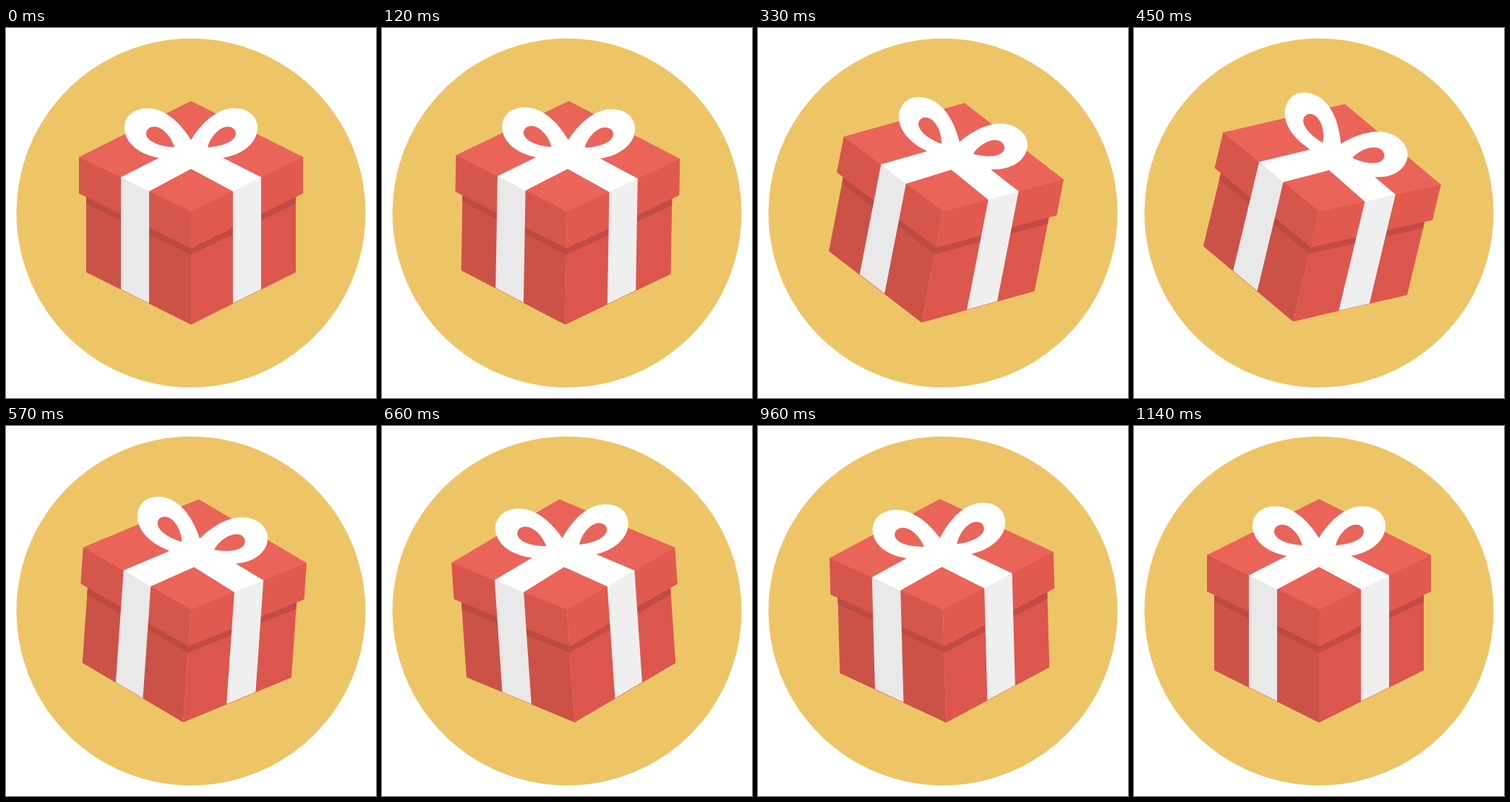
Write an HTML page that moves like this. It is 512x512 px and loops after 2.14 s.

```html
<!DOCTYPE html>
<html>
<head>
<meta charset="utf-8">
<title>Gift box</title>
<style>
html, body { margin: 0; height: 100%; overflow: hidden; background: #fff; }
svg { display: block; width: 100%; height: 100%; }
</style>
</head>
<body>
<svg viewBox="0 0 512 512">
  <circle cx="256" cy="256" r="241.5" fill="#eec566"/>
  <g id="box">
    <path fill="#cc5248" d="M111 230 256 300V410.5L111 338Z"/>
    <path fill="#dc564e" d="M401 230 256 300V410.5L401 338Z"/>
    <path fill="#bb4a41" d="M111 230 256 300V314L111 243Z"/>
    <path fill="#c24b43" d="M401 230 256 300V314L401 243Z"/>
    <path fill="#d6564c" d="M101 178 256 253V305L101 229Z"/>
    <path fill="#e1594f" d="M411 178 256 253V305L411 229Z"/>
    <path fill="#ea645a" d="M256 101 411 178.5 256 254 101 178.5Z"/>
    <path fill="#e9e9e9" d="M159 206 198 225V381L159 361.5Z"/>
    <path fill="#efefef" d="M353 206 314 225V381L353 361.5Z"/>
    <path fill="#fff" d="M159 206.5 256 157 353 206.5 314 226 256 195 198 226Z"/>
    <g id="bow" fill="#fff" fill-rule="evenodd">
      <path id="loop" d="M256 155C244 135 222 111 196 111 176 111 164 123 164 138 164 162 190 177 214 180L256.5 190V155Z
        M233 165C229 150 216 136.500 205 136.500 198 136.500 194 141 194 146 194 156 211 164 233 165Z"/>
      <use href="#loop" transform="matrix(-1 0 0 1 512 0)"/>
    </g>
  </g>
</svg>
<script>
const LOOP = 2140, STEP = 30, LAG = 60;
const box = document.getElementById('box'), bow = document.getElementById('bow');

// Swings: start, end, from angle, to angle, easing handles
const swings = [
  [0, 420, 0, 14, 0.7, 0.7],
  [420, 720, 14, -6, 1 / 3, 2 / 3],
  [720, 1080, -6, 0, 1 / 3, 2 / 3]
];

// Cubic bezier easing (x1, 0, x2, 1), solved by bisection
function ease(x, x1, x2) {
  let lo = 0, hi = 1, s;
  for (let i = 0; i < 24; i++) {
    s = (lo + hi) / 2;
    const r = 1 - s;
    if (3 * r * r * s * x1 + 3 * r * s * s * x2 + s ** 3 < x) lo = s;
    else hi = s;
  }
  return s * s * (3 - 2 * s);
}

function angle(t) {
  const swing = swings.find(([a, b]) => t > a && t < b + 0.001);
  if (!swing) return 0;
  const [a, b, from, to, x1, x2] = swing;
  return from + (to - from) * ease((t - a) / (b - a), x1, x2);
}

function draw(now) {
  const t = Math.floor((now % LOOP) / STEP) * STEP;
  box.setAttribute('transform', `rotate(${angle(t)} 256 256)`);
  bow.setAttribute('transform', `rotate(${angle(t - LAG)} 256 185)`);
  requestAnimationFrame(draw);
}
draw(0);
</script>
</body>
</html>
```
